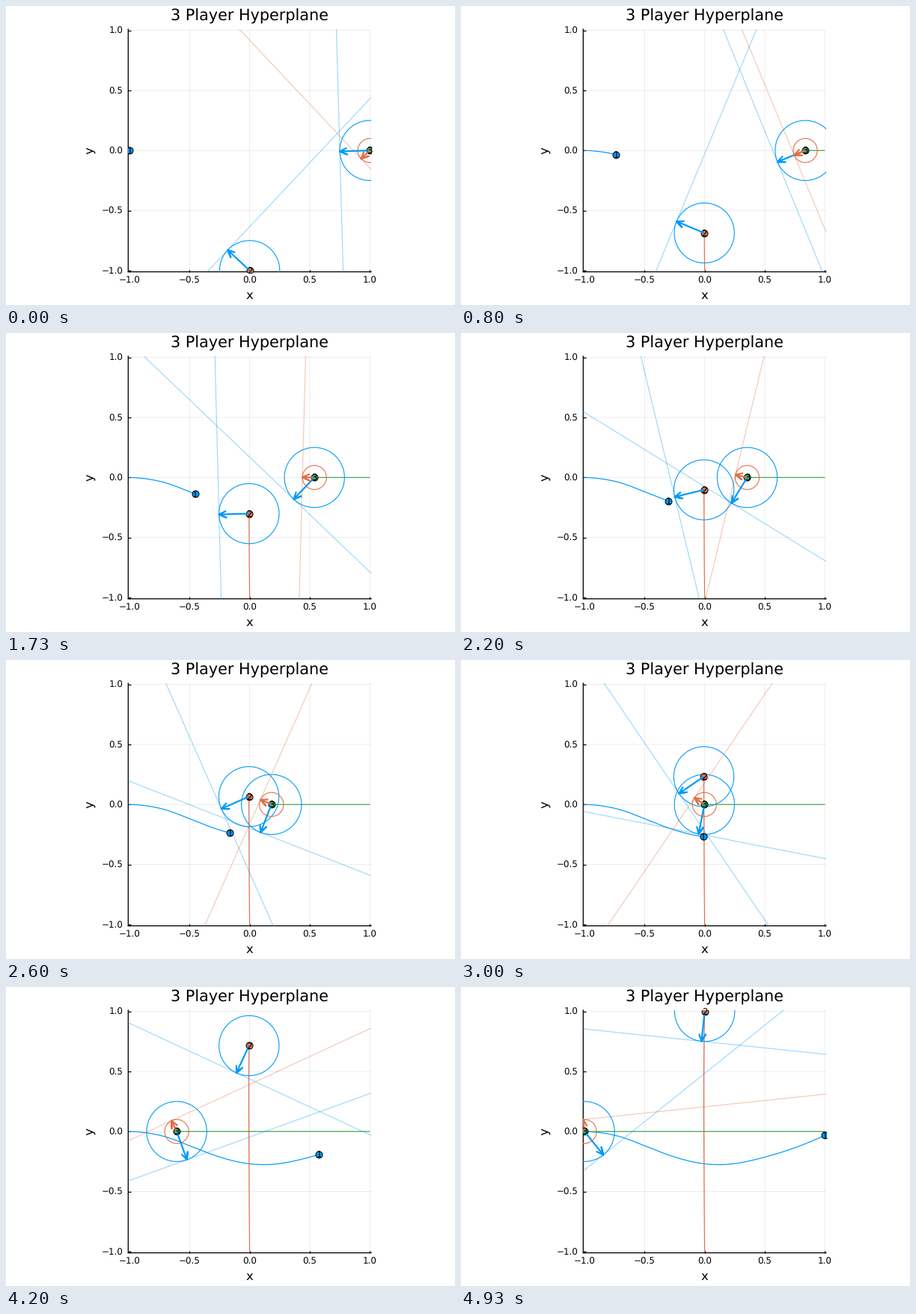
Animation of 600 by 400 pixels, one loop 4.99 s. Source, as a matplotlib script:

```python
import numpy as np
import matplotlib.pyplot as plt
from matplotlib.animation import FuncAnimation

W, H, DPI = 600, 400, 100
FRAMES, LOOP_MS = 75, 4990
PX = 72 / DPI            # one pixel in points
UNIT = 160.6             # pixels per data unit
CX, CY, HALF = 325.6, 193.3, 162.3
LIM = HALF / UNIT
BLUE, ORANGE, GREEN = "#009AFA", "#E36F47", "#3EA44E"
SPIN = 0.03              # radians per frame

plt.rcParams.update({
    "font.family": "DejaVu Sans",
    "font.size": 11.9 * PX,
    "text.hinting": "none",
    "path.simplify": False,
    "path.snap": False,
})


def spline(keys, vals, at):
    """Cubic Hermite curve through (keys, vals), evaluated at the given points."""
    k, v = np.array(keys, float), np.array(vals, float)
    m = np.gradient(v, k, edge_order=2)
    i = np.clip(np.searchsorted(k, at, "right") - 1, 0, len(k) - 2)
    h = k[i + 1] - k[i]
    s = (at - k[i]) / h
    return ((2 * s**3 - 3 * s**2 + 1) * v[i] + (s**3 - 2 * s**2 + s) * h * m[i]
            + (3 * s**2 - 2 * s**3) * v[i + 1] + (s**3 - s**2) * h * m[i + 1])


KEYS = [0, 12, 26, 33, 45, 63, 74]
steps = np.arange(FRAMES)
x1 = spline(KEYS, [-1, -.738, -.453, -.302, -.011, .576, 1], steps)
y1 = spline([-1, -.738, -.453, -.302, -.011, .11, .576, 1],
            [0, -.034, -.137, -.195, -.268, -.276, -.192, -.031], x1)
x2 = spline(KEYS, [0, -.003, -.005, -.006, -.007, -.005, 0], steps)
y2 = spline(KEYS, [-1, -.687, -.301, -.103, .232, .715, 1], steps)
x3 = spline(KEYS, [1, .837, .539, .354, -.002, -.607, -1], steps)
paths = [np.column_stack(p) for p in ((x1, y1), (x2, y2), (x3, 0 * x3))]

fig = plt.figure(figsize=(W / DPI, H / DPI), dpi=DPI, facecolor="white")
ax = fig.add_axes([(CX - HALF) / W, 1 - (CY + HALF) / H,
                   2 * HALF / W, 2 * HALF / H])
ax.set(xlim=(-LIM, LIM), ylim=(-LIM, LIM))
ax.set_autoscale_on(False)
ax.set_axisbelow(True)
ax.patch.set_visible(False)
ax.spines[["top", "right"]].set_visible(False)
for side in ("left", "bottom"):
    ax.spines[side].set_linewidth(1.3 * PX)
    ax.spines[side].set_snap(False)

ticks = [-1, -.5, 0, .5, 1]
ax.set_xticks(ticks)
ax.set_yticks(ticks)
ax.tick_params(direction="in", length=3.5 * PX, width=1.2 * PX)
ax.tick_params(axis="x", pad=6.6 * PX)
ax.tick_params(axis="y", pad=7.1 * PX)
ax.grid(color="black", alpha=0.1, lw=0.7 * PX)


def label(x, y, s, size, **kw):
    fig.text(x / W, 1 - y / H, s, fontsize=size * PX, ha="center", **kw)


label(CX, 19.2, "3 Player Hyperplane", 20.8, va="baseline")
label(CX, 391.5, "x", 16.4, va="baseline")
label(112.5, CY, "y", 16.4, va="center", rotation=90)


def line(color, width, z, alpha=1):
    return ax.plot([], [], color=color, lw=width * PX, alpha=alpha, zorder=z,
                   snap=False, solid_joinstyle="round",
                   solid_capstyle="butt")[0]


def polar(r, angle):
    return r * np.array([np.cos(angle), np.sin(angle)])


class Plane:
    """Keep-out circle with its rotating normal and tangent line."""

    ring = np.linspace(0, 2 * np.pi, 121)

    def __init__(self, owner, radius, start, spin, color):
        self.owner, self.radius = owner, radius
        self.start, self.spin = np.radians(start), spin
        self.circle = line(color, 1.1, 4)
        self.tangent = line(color, 1.1, 4, alpha=0.4)
        self.arrow = line(color, 2.2, 5)

    def update(self, n):
        p = paths[self.owner][n]
        a = self.start + self.spin * n
        tip = p + polar(self.radius, a)
        side = polar(4, a + np.pi / 2)
        barbs = [tip - polar(10.5 / UNIT, a + d) for d in (-0.43, 0.43)]
        self.circle.set_data(*(p[:, None] + polar(self.radius, self.ring)))
        self.tangent.set_data(*np.array([tip - side, tip + side]).T)
        self.arrow.set_data(*np.array([p, tip, barbs[0], tip, barbs[1]]).T)


planes = [
    Plane(1, 0.25, 136.8, SPIN, BLUE),
    Plane(2, 0.25, 181.6, SPIN, BLUE),
    Plane(2, 0.10, 223.2, -SPIN, ORANGE),
]

colors = [BLUE, ORANGE, GREEN]
trails = [line(c, 1.2, 3) for c in colors]
dots = [ax.plot([], [], "o", ms=9 * PX, mfc=c, mec="black", mew=PX,
                snap=False, zorder=4.5)[0] for c in colors]
names = [ax.text(0, 0, str(k + 1), ha="center", va="baseline", zorder=6)
         for k in range(3)]


def update(n):
    for path, trail, dot, name in zip(paths, trails, dots, names):
        x, y = path[n]
        trail.set_data(*path[:n + 1].T)
        dot.set_data([x], [y])
        name.set_position((x, y - 4.3 / UNIT))
    for plane in planes:
        plane.update(n)


anim = FuncAnimation(fig, update, frames=FRAMES, interval=LOOP_MS / FRAMES,
                     init_func=lambda: update(0), repeat=True, repeat_delay=0)
plt.show()
```
